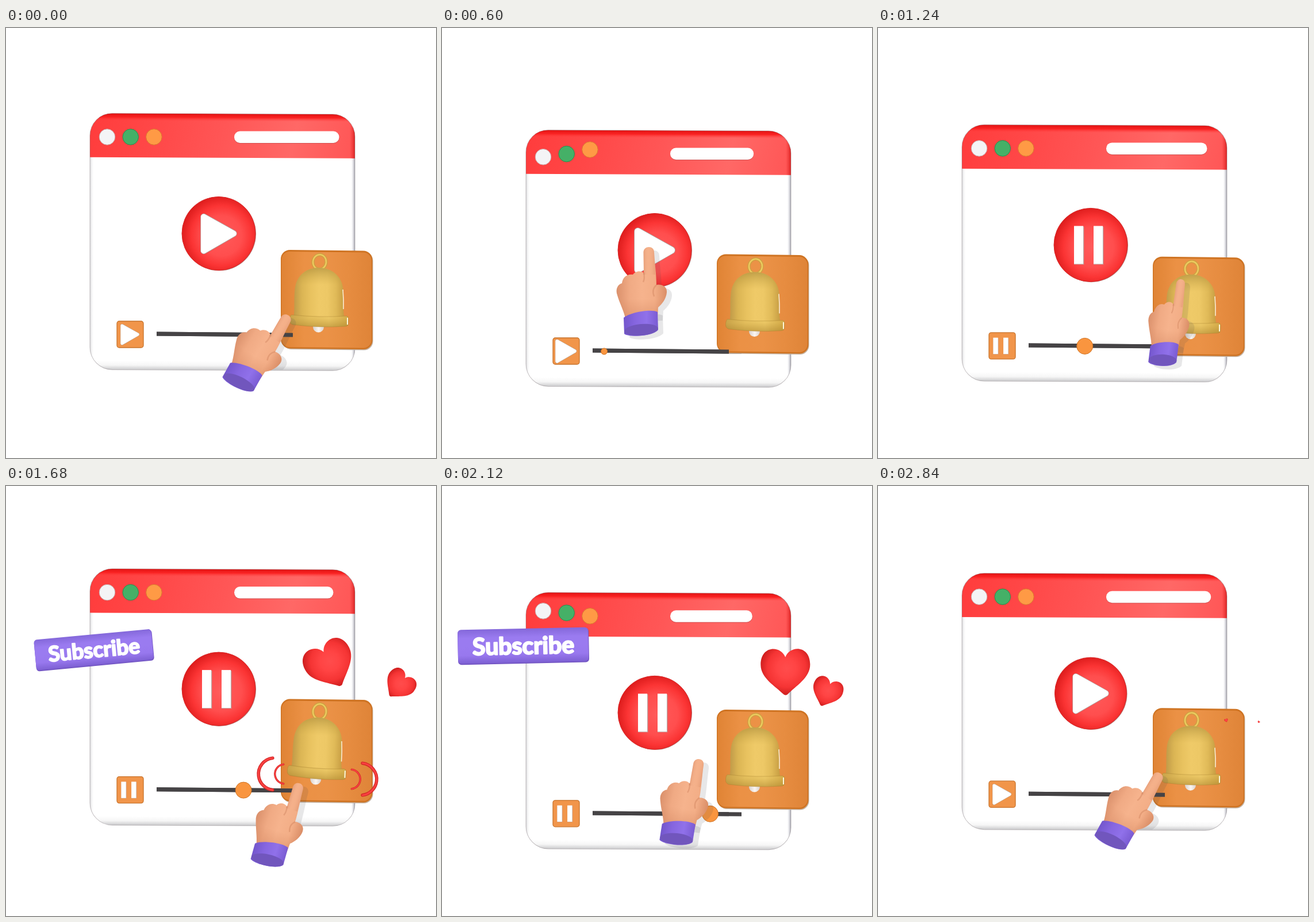
An HTML page with a canvas that plays this animation: 748 by 748 pixels, repeating every 2880 ms.

```html
<!DOCTYPE html>
<html lang="en">
<head>
<meta charset="utf-8">
<title>Video player</title>
<style>
html, body { margin: 0; width: 100%; height: 100%; overflow: hidden; background: #fff; }
canvas { display: block; width: 100vw; height: 100vh; }
</style>
</head>
<body>
<canvas id="stage" width="748" height="748"></canvas>
<script>
const c = document.getElementById('stage').getContext('2d');
const LOOP = 2880, TAU = Math.PI * 2;

// Timing helpers
const mix = (a, b, u) => a + (b - a) * u;
const span = (t, a, b) => Math.min(1, Math.max(0, (t - a) / (b - a)));
const smooth = u => (1 - Math.cos(Math.PI * u)) / 2;
const wave = (t, period, shift = 0) => Math.cos(TAU * (t - shift) / period);
const bump = (t, mid, reach) => 1 - smooth(Math.min(1, Math.abs(t - mid) / reach));
const pop = u => 1 + 3 * (u - 1) ** 3 + 2 * (u - 1) ** 2;
const shown = (t, in0, in1, out0, out1) => Math.min(span(t, in0, in1), 1 - span(t, out0, out1));

// Eases through [time, ...values] key poses and back to the first one
function glide(t, keys) {
  const i = keys.findLastIndex(k => k[0] <= t);
  const [t0, ...from] = keys[i];
  const [t1, ...to] = keys[i + 1] || [LOOP, ...keys[0].slice(1)];
  const u = smooth(span(t, t0, t1));
  return from.map((v, n) => mix(v, to[n], u));
}

const windowTop = t => 168.5 - 26 * wave(t, 1440, 160);
const searchRight = t => 559.5 + 20 * wave(t, 1440);
const knobX = t => 282 + 0.1213 * (t - 600);
const knobR = t => 14 * shown(t, 550, 680, 2350, 2460);
const buttonR = t => 64 + 5 * bump(t, 2440, 160) - 4 * bump(t, 720, 120) - 3 * bump(t, 2760, 160);
const playSize = t => pop(1 - shown(t, 490, 737, 2380, 2660));
const pauseSize = t => pop(shown(t, 620, 840, 2380, 2620));
const tagSize = t => pop(shown(t, 1320, 1560, 2500, 2780)) * (1 - .1 * bump(t, 1720, 400));
const heartSize = t => shown(t, 1360, 1600, 2600, 2860);
const ringSize = t => pop(shown(t, 1400, 1560, 1700, 1840));

function hop(t, start) {
  const u = span(t, start, start + 480);
  return (6 * u - 10.5) * Math.sin(TAU * u);
}

const panelKeys = [[0, 472], [1140, 486], [1680, 460], [2480, 486]];
// time, fingertip x and y, turn, width
const handKeys = [
  [0, 488, 505, 31, 1],
  [600, 360, 387, 0, 1],
  [1240, 527, 443, 8.7, .82],
  [1680, 509, 523, 17.5, .97],
  [2120, 447, 481, 11, .97],
  [2760, 488, 505, 31, 1]
];

// Drawing helpers
function at(x, y, deg, sx, sy, draw) {
  c.save();
  c.translate(x, y);
  c.rotate(deg * Math.PI / 180);
  c.scale(sx, sy);
  draw();
  c.restore();
}

// Gradient with evenly spaced colours
function shade(g, ...colors) {
  colors.forEach((col, i) => g.addColorStop(i / (colors.length - 1), col));
  return g;
}
const across = (x0, x1, ...colors) => shade(c.createLinearGradient(x0, 0, x1, 0), ...colors);
const down = (y0, y1, ...colors) => shade(c.createLinearGradient(0, y0, 0, y1), ...colors);
const glow = (x, y, r, ...colors) => shade(c.createRadialGradient(x, y, 0, x, y, r), ...colors);

function fill(color) {
  c.fillStyle = color;
  c.fill();
}

function outline(color, width) {
  c.strokeStyle = color;
  c.lineWidth = width;
  c.stroke();
}

function band(x, y, w, h, color) {
  c.fillStyle = color;
  c.fillRect(x, y, w, h);
}

function box(x, y, w, h, r, color) {
  c.beginPath();
  c.roundRect(x, y, w, h, r);
  fill(color);
}

function disc(x, y, r, color, edge) {
  if (r <= 0) return;
  c.beginPath();
  c.arc(x, y, r, 0, TAU);
  fill(color);
  if (edge) outline(edge, 1);
}

function playMark() {
  c.beginPath();
  c.moveTo(-26, -29);
  c.lineTo(26, 0);
  c.lineTo(-26, 30);
  c.closePath();
  c.lineJoin = 'round';
  outline('#a9a09d', 11.4);
  outline('#fff', 10);
  fill('#fff');
}

function pauseMark() {
  for (const x of [-29, 5]) {
    band(x, -32, 17.3, 66, '#b9a5a3');
    band(x, -33, 16, 66, '#fff');
  }
}

function drawMarks(t, x, y, sx, sy) {
  const play = playSize(t), pause = pauseSize(t);
  if (play > .01) at(x, y, 0, sx * play, sx * play, playMark);
  if (pause > .01) at(x, y, 0, sx * pause, sy * pause, pauseMark);
}

function drawLine(top, end) {
  c.beginPath();
  c.moveTo(262, top + 383.6);
  c.lineTo(end, top + 384.6 + (end - 262) * .004);
  outline('#454345', 7);
}

function windowPath() {
  c.beginPath();
  c.roundRect(146, 0, 461, 446, 39);
}

function drawWindow(t, top) {
  c.save();
  c.transform(1, .004, 0, 1, 0, top - .8);
  windowPath();
  c.save();
  c.clip();
  band(146, 0, 461, 446, '#fff');
  band(146, 430, 461, 16, down(430, 446, '#fff', '#f6f6f6', '#c9c9cb'));
  band(146, 76, 7, 370, across(146, 153, '#d8d8da', '#ffffff00'));
  band(600, 76, 7, 370, across(600, 607, '#ffffff00', '#e4e4e8', '#a9a9b2'));
  const red = c.createLinearGradient(146, 0, 607, 110);
  band(146, 0, 461, 76.5, shade(red, '#ff3c3c', '#ff4848', '#ff5656', '#ff6866', '#ff5454'));
  band(146, 0, 461, 13, down(0, 13, '#e01414', '#fa2222', '#ff404000'));
  band(598, 0, 9, 76.5, across(598, 607, '#f0303000', '#d82424'));
  c.restore();
  outline('rgba(110,100,105,.4)', 1);
  c.restore();

  const dots = [['#f4f4f6', '#c8a5a5'], ['#45b067', '#2d8a4b'], ['#ff9a45', '#d8782d']];
  dots.forEach(([color, edge], i) => {
    const y = top + 41 + hop(t, 275 + 80 * i) + hop(t, 1995 + 80 * i);
    disc(176 + 40.7 * i, y, 13.8, color, edge);
  });
  const w = searchRight(t) - 397;
  box(397, top + 31.5, w, 21, 10, '#d05050');
  box(397, top + 31, w, 20.5, 10, '#fff');

  const r = buttonR(t), y = top + 209;
  disc(371, y + .8, r, '#b78380');
  disc(370, y, r, glow(375, y + 4, r + 6, '#ff5c5c', '#ff5454', '#ff4e4e', '#fb3434', '#dd1c1c'), '#d92a2a');
  drawMarks(t, 370, y, 1, 1);

  box(193, top + 361.5, 46, 46, 4, '#f1954a');
  outline('#c9742c', 1.3);
  drawMarks(t, 215.5, top + 384.5, .52, .43);
}

// Origin is the centre of the hanging loop
function bell() {
  c.beginPath();
  c.ellipse(0, 0, 11.5, 12.8, .1, 0, TAU);
  outline('#c9a040', 5);
  outline('#ecc95e', 2.6);

  disc(-2, 113, 9.5, across(-11, 8, '#d9d2cd', '#fbf6f2', '#d8cfc8'));

  c.beginPath();
  c.moveTo(-45, 95);
  c.bezierCurveTo(-43, 80, -45, 65, -43, 47);
  c.bezierCurveTo(-40, 22, -22, 10, -1, 10);
  c.bezierCurveTo(20, 10, 39, 24, 41, 47);
  c.bezierCurveTo(42, 65, 40, 80, 43, 97);
  c.closePath();
  fill(across(-45, 43, '#c09a48', '#dbb554', '#e8c25f', '#efca68', '#edc866', '#e0ba58', '#c69c42'));
  fill(down(10, 40, 'rgba(150,120,45,.5)', 'rgba(190,155,60,0)'));
  c.beginPath();
  c.moveTo(40.5, 48);
  c.quadraticCurveTo(42, 66, 41.5, 82);
  outline('rgba(255,250,235,.85)', 1.6);

  c.beginPath();
  c.moveTo(-49, 92);
  c.quadraticCurveTo(0, 97, 47, 94);
  c.quadraticCurveTo(50.5, 95, 50.5, 99);
  c.lineTo(50, 109);
  c.quadraticCurveTo(49, 112, 44, 112);
  c.quadraticCurveTo(0, 115, -47, 109);
  c.quadraticCurveTo(-52, 107, -52, 102);
  c.quadraticCurveTo(-52, 94, -49, 92);
  fill(across(-52, 50, '#c9a349', '#e2bd5b', '#eac664', '#d2a947'));
  fill(down(98, 114, 'rgba(160,120,35,0)', 'rgba(150,110,30,.4)'));
  outline('rgba(155,118,40,.35)', 1);
  band(47.5, 97, 2, 12, '#fff6dc');
}

function drawPanel(t, mid) {
  const press = bump(t, 1680, 320);
  c.save();
  c.translate(0, mid);
  c.scale(1, 1 + .04 * press);
  c.save();
  c.transform(1, .012, 0, 1, 0, -92);
  box(479.5, 1.5, 159, 171.5, 16, '#c4b2a2');
  box(478, 0, 159.5, 171.5, 16, '#cf7423');
  box(479.5, 3, 156, 166, 14, across(480, 636, '#e08435', '#eb9145', '#eb9247', '#e68c40', '#df8438'));
  c.restore();
  at(545.5, -65, 2.4 * press * wave(t, 320, 1680), 1, 1, bell);
  c.restore();
}

function drawRings(size, y) {
  if (size < .01) return;
  c.lineCap = 'round';
  for (const side of [-1, 1]) for (const r of [17, 28]) {
    const x = 542 + side * (30 + r * 1.6) * size;
    at(x, y + (side > 0 ? 9 : 0), 0, size * side, size, () => {
      c.beginPath();
      c.arc(0, 0, r, -1.45, 1.45);
      outline('#cf2323', r * .2);
      outline('#f84040', r * .12);
    });
  }
  c.lineCap = 'butt';
}

function heart() {
  c.beginPath();
  c.moveTo(0, -25);
  c.bezierCurveTo(8, -46, 43, -46, 43, -12);
  c.bezierCurveTo(43, 11, 18, 25, 3, 40);
  c.quadraticCurveTo(0, 42, -3, 40);
  c.bezierCurveTo(-18, 25, -43, 11, -43, -12);
  c.bezierCurveTo(-43, -46, -8, -46, 0, -25);
  fill(glow(2, -6, 50, '#ff4c4c', '#ff4444', '#f53434', '#c41818'));
}

function drawHearts(t) {
  const s = heartSize(t);
  if (s <= 0) return;
  const u = (1 - wave(t, 960, 1680)) / 2;
  const place = (home, out, into) => mix(home, mix(out, into, u), s);
  at(place(608, 564, 598), place(415, 311, 323), -27 * (1 - u), s, s, heart);
  at(place(661, 684, 669), place(415, 346, 359), 40 - 18 * u, s * .62, s * .62, heart);
}

function drawTag(t) {
  const s = tagSize(t);
  if (s < .01) return;
  at(255.5, 275.5, (t - 1680) * .0095 - 5.4, s, s, () => {
    box(-228, -29, 228, 60, 6, '#7457c4');
    box(-228, -30, 227, 59, 6, down(-30, 30, '#8468da', '#9a7bf0', '#9a7bf0', '#9878ee', '#7c5fd2'));
    c.font = 'bold 41px Lato, "Open Sans", sans-serif';
    c.textAlign = 'center';
    c.lineJoin = 'round';
    c.fillStyle = c.strokeStyle = '#fff';
    c.lineWidth = 2.4;
    c.fillText('Subscribe', -114, 14.5);
    c.strokeText('Subscribe', -114, 14.5);
  });
}

// Hand shapes hang from the fingertip at the origin
function fistPath() {
  c.beginPath();
  c.moveTo(-9.5, 3);
  c.bezierCurveTo(-9, -9, 9, -9, 9, 3);
  c.bezierCurveTo(10, 22, 13, 42, 13, 60);
  c.bezierCurveTo(24, 58, 32, 64, 31, 73);
  c.bezierCurveTo(30, 84, 23, 93, 16, 99);
  c.lineTo(15, 116);
  c.lineTo(-41, 118);
  c.bezierCurveTo(-44, 104, -51, 92, -55, 78);
  c.bezierCurveTo(-59, 67, -54, 59, -47, 57);
  c.bezierCurveTo(-46, 47, -38, 40, -28, 42);
  c.bezierCurveTo(-24, 36, -15, 34, -9, 39);
  c.closePath();
}

function cuffPath() {
  c.beginPath();
  c.moveTo(-44, 117);
  c.bezierCurveTo(-34, 108, 4, 101, 15, 107);
  c.lineTo(16, 138);
  c.bezierCurveTo(8, 149, -34, 152, -43, 145);
  c.closePath();
}

function handShadow() {
  for (const path of [fistPath, cuffPath]) {
    path();
    fill('rgba(70,70,80,.13)');
  }
}

function handBody() {
  fistPath();
  fill(across(-56, 32, '#db916c', '#f0aa84', '#f6b38d', '#f3ae87', '#d98c65'));
  c.save();
  c.clip();
  band(-60, 84, 95, 36, down(84, 118, 'rgba(200,120,80,0)', 'rgba(195,115,80,.35)'));
  band(-10, -8, 21, 50, across(-10, 10, 'rgba(205,125,90,.4)', 'rgba(250,185,145,0)', 'rgba(205,125,90,.25)'));
  c.beginPath();
  c.moveTo(-9, 38);
  c.quadraticCurveTo(-7, 49, -10, 55);
  c.moveTo(13, 60);
  c.quadraticCurveTo(4, 68, 9, 80);
  outline('rgba(190,110,75,.3)', 2.5);
  c.restore();

  cuffPath();
  fill(across(-44, 16, '#7356cc', '#8666e0', '#9071ea', '#7a5bd2'));
  c.beginPath();
  c.ellipse(-13.5, 138, 29.5, 10, -.09, 0, TAU);
  fill('#7156bd');
}

function drawHand(t, top) {
  const [x, y, turn, wide] = glide(t, handKeys);
  c.save();
  c.save();
  c.translate(0, top);
  windowPath();
  c.restore();
  c.clip();
  at(x + 9, y + 6, turn, wide, 1, handShadow);
  c.restore();
  at(x, y, turn, wide, 1, handBody);
}

function drawScene(t) {
  const top = windowTop(t), [mid] = glide(t, panelKeys);
  band(0, 0, 748, 748, '#fff');
  drawWindow(t, top);
  drawLine(top, 521);
  drawPanel(t, mid);
  drawLine(top, 499);
  disc(knobX(t), top + 385, knobR(t), '#f9953f', '#cf7426');
  drawRings(ringSize(t), mid + 41);
  drawHearts(t);
  drawTag(t);
  drawHand(t, top);
}

const start = performance.now();
function tick() {
  drawScene((performance.now() - start) % LOOP);
  requestAnimationFrame(tick);
}
tick();
</script>
</body>
</html>
```
